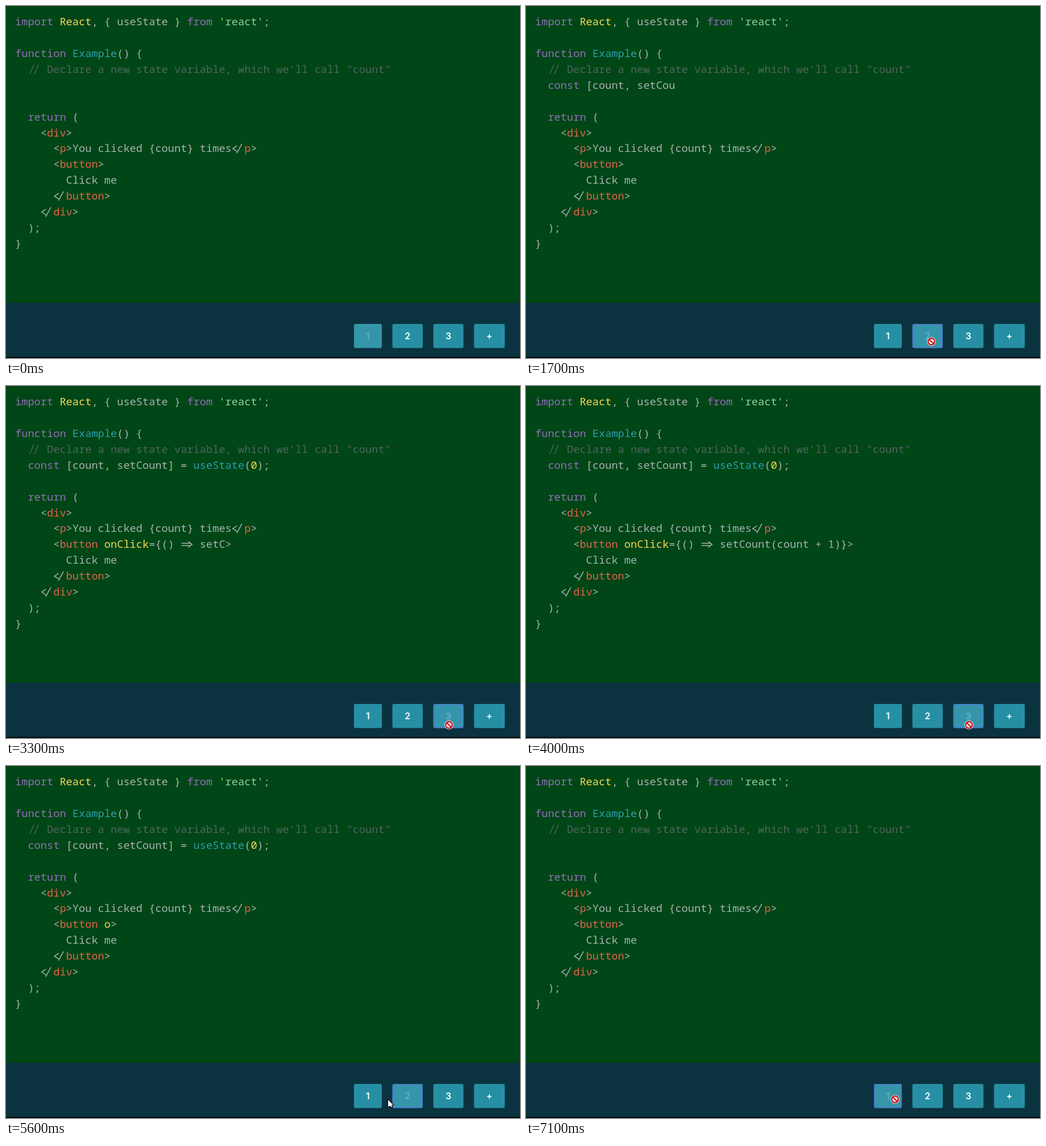
Recreate the animation shown at these times as an HTML page with a canvas. Size 904x620 px, loop 7200 ms.

```html
<!DOCTYPE html>
<html lang="en">
<head>
<meta charset="utf-8">
<title>Code steps</title>
<style>
html, body { margin: 0; width: 100%; height: 100%; overflow: hidden; background: #004616; }
canvas { display: block; }
</style>
</head>
<body>
<canvas id="stage" width="904" height="620"></canvas>
<script>
const ctx = document.getElementById('stage').getContext('2d');
const LOOP = 7200, STEP = 100, PITCH = 11.2, LEFT = 16, ROW = 27.93, BASE = 34;
const CHAR_MS = 22, RELEASE = 150, HOP = 300;
const INK = {
  p: '#9070b8', y: '#f6d858', t: '#a7b3b3', b: '#2f9cab',
  s: '#8bd3a3', c: '#4e665f', r: '#e6614e'
};

// Each line alternates colour key and text.
const LINES = [
  "p|import|t| |y|React|t|, { useState } |p|from|t| |s|'react'|t|;",
  "",
  "p|function|t| |b|Example|t|() {",
  "c|  // Declare a new state variable, which we'll call \"count\"",
  "", "",
  "p|  return|t| (",
  "t|    <|r|div|t|>",
  "t|      <|r|p|t|>You clicked {count} times</|r|p|t|>",
  "t|      <|r|button",
  "t|        Click me",
  "t|      </|r|button|t|>",
  "t|    </|r|div|t|>",
  "t|  );",
  "t|}"
];
const STATE_LINE = "p|const|t| [count, setCount] = |b|useState|t|(|y|0|t|);";
const CLICK_ATTR = "t| |y|onClick|t|={() => setCount(count + 1)}";

const TOP = 560, HEIGHT = 42.5, GAP = 18.6;
let edge = 612;
const BUTTONS = [['1', 49], ['2', 53.4], ['3', 53], ['+', 54]].map(([label, w]) => {
  const x = edge;
  edge += w + GAP;
  return { label, x, w };
});

// Press time and button index; each step starts on release.
const CLICKS = [[1100, 1], [2700, 2], [4700, 1], [6000, 0]];
const [SHOW_STATE, SHOW_ATTR, HIDE_ATTR, HIDE_STATE] = CLICKS.map(c => c[0] + RELEASE);

// Pointer stops: arrival time, x, y. It hops to each and rests.
const STOPS = [
  [700, 703, 650], [1000, 711, 586], [1500, 713, 591], [2700, 766, 599],
  [3000, 779, 597], [4600, 712, 591], [5600, 672, 588], [5900, 649, 587]
];

const clamp = (v, max) => Math.min(max, Math.max(0, v));
const pressed = (t, first) => CLICKS.reduce((old, [at, i]) => at <= t ? i : old, first);
const width = spec => spec.split('|').filter((_, i) => i % 2).join('').length;

function typed(t, length, show, hide) {
  const chars = from => clamp(Math.floor((t - from) / CHAR_MS), length);
  return chars(show) - chars(hide);
}

function pointerAt(t) {
  if (t <= STOPS[0][0]) return null;
  let [, x, y] = STOPS[0];
  for (const [at, toX, toY] of STOPS.slice(1)) {
    const k = clamp((t - at) / HOP + 1, 1);
    x += (toX - x) * k;
    y += (toY - y) * k;
  }
  return { x, y };
}

function segment(x1, y1, x2, y2) {
  ctx.moveTo(x1, y1);
  ctx.lineTo(x2, y2);
}
const slash = (x, y, w) => segment(x, y + 2, x + w, y - 14.5);
function chevron(x, y, w) {
  segment(x, y - 11.3, x + w, y - 6.3);
  ctx.lineTo(x, y - 1.3);
}

// Character pairs that join into one glyph.
const LIGATURES = {
  '//'(x, y) { slash(x + 3.5, y, 7); slash(x + 11.5, y, 7); },
  '</'(x, y) { chevron(x + 9.5, y, -7.5); slash(x + 9, y, 9); },
  '=>'(x, y) {
    for (const up of [8.3, 4.3]) segment(x + 1.5, y - up, x + 17, y - up);
    chevron(x + 13.5, y, 6.5);
  }
};

function code(row, spec, col = 0, limit = Infinity) {
  const parts = spec.split('|'), y = BASE + row * ROW;
  ctx.font = '18.67px "Noto Sans Mono", "DejaVu Sans Mono", monospace';
  ctx.textAlign = 'left';
  ctx.textBaseline = 'alphabetic';
  ctx.lineWidth = 1.5;
  for (let i = 0; i + 1 < parts.length; i += 2) {
    const text = parts[i + 1].slice(0, limit);
    limit -= text.length;
    ctx.fillStyle = ctx.strokeStyle = INK[parts[i]];
    for (const glyph of text.match(/\/\/|<\/|=>|./g) || []) {
      const x = LEFT + col * PITCH;
      if (LIGATURES[glyph]) {
        ctx.beginPath();
        LIGATURES[glyph](x, y);
        ctx.stroke();
      } else ctx.fillText(glyph, x, y);
      col += glyph.length;
    }
  }
  return col;
}

function button(b, disabled, hover, focused) {
  ctx.beginPath();
  ctx.roundRect(b.x, TOP, b.w, HEIGHT, 3);
  ctx.fillStyle = disabled ? '#3595aa' : hover ? '#007c91' : '#278fa4';
  ctx.fill();
  if (focused) {
    ctx.beginPath();
    ctx.roundRect(b.x + .75, TOP + .75, b.w - 1.5, HEIGHT - 1.5, 3);
    ctx.strokeStyle = 'rgba(85, 112, 230, .8)';
    ctx.lineWidth = 1.5;
    ctx.stroke();
  }
  ctx.font = '600 16px Inter, sans-serif';
  ctx.textAlign = 'center';
  ctx.textBaseline = 'middle';
  ctx.fillStyle = disabled ? '#65b2c2' : '#fff';
  ctx.fillText(b.label, b.x + b.w / 2, 582);
}

function outlined() {
  ctx.lineWidth = 2;
  ctx.strokeStyle = '#000';
  ctx.fillStyle = '#fff';
  ctx.stroke();
  ctx.fill();
}

const CURSORS = {
  arrow(x, y) {
    ctx.beginPath();
    segment(x, y, x, y + 12);
    ctx.lineTo(x + 8.5, y + 8.5);
    ctx.closePath();
    segment(x + 3, y + 8, x + 5, y + 13);
    ctx.lineTo(x + 7, y + 12);
    ctx.lineTo(x + 5, y + 7);
    outlined();
  },
  hand(x, y) {
    ctx.beginPath();
    ctx.roundRect(x - 1.5, y, 3, 11, 1.5);
    ctx.roundRect(x - 3.5, y + 6, 12, 9.5, 3);
    outlined();
  },
  blocked(x, y) {
    ctx.beginPath();
    ctx.arc(x, y, 5.7, 0, 2 * Math.PI);
    ctx.fillStyle = '#fff';
    ctx.fill();
    segment(x - 4, y - 4, x + 4, y + 4);
    for (const [color, w] of [['#fff', 4], ['#c4141c', 2.4]]) {
      ctx.strokeStyle = color;
      ctx.lineWidth = w;
      ctx.stroke();
    }
  }
};

function band(color, top, bottom) {
  ctx.fillStyle = color;
  ctx.fillRect(0, top, 904, bottom - top);
}

function draw(t) {
  band('#004616', 0, 523);
  band('#0b333f', 522.5, 618);
  band('#02080b', 618, 620);

  const ends = LINES.map((line, row) => code(row, line));
  code(4, STATE_LINE, 2, typed(t, width(STATE_LINE), SHOW_STATE, HIDE_STATE));
  const col = code(9, CLICK_ATTR, ends[9], typed(t, width(CLICK_ATTR), SHOW_ATTR, HIDE_ATTR));
  code(9, "t|>", col);

  const p = pointerAt(t), current = pressed(t - RELEASE, 0), focus = pressed(t, -1);
  const over = p ? BUTTONS.findIndex(b =>
    p.x >= b.x && p.x <= b.x + b.w && p.y >= TOP && p.y <= TOP + HEIGHT) : -1;
  BUTTONS.forEach((b, i) => button(b, i === current, i === over, i === focus));
  if (p) CURSORS[over < 0 ? 'arrow' : over === current ? 'blocked' : 'hand'](p.x, p.y);
}

const start = performance.now();
function tick() {
  const t = Math.max(0, performance.now() - start) % LOOP;
  draw(Math.floor(t / STEP) * STEP);
  requestAnimationFrame(tick);
}
tick();
</script>
</body>
</html>
```
